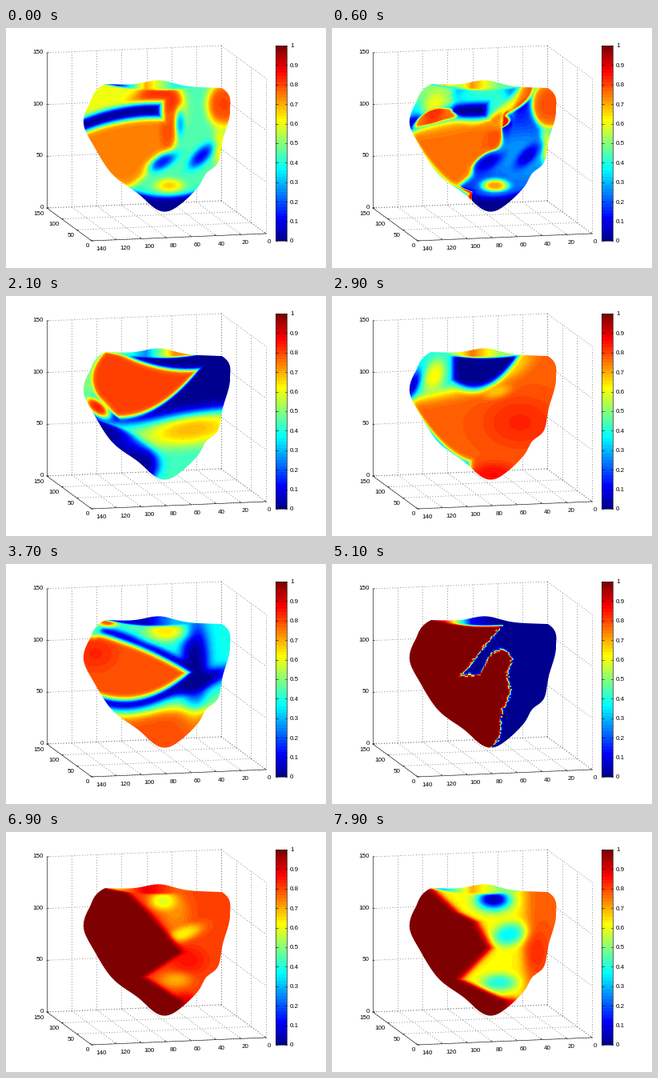
Write a matplotlib script that moves like this. It is 400 px wide and 300 px high and loops after 8 s.

```python
import numpy as np
import matplotlib.pyplot as plt
from matplotlib.animation import FuncAnimation
from matplotlib.path import Path

W, H, DPI = 400, 300, 100
PX = 72 / DPI
FRAMES, STEP = 80, 100

plt.rcParams["font.family"] = "Liberation Sans"
fig = plt.figure(figsize=(W / DPI, H / DPI), dpi=DPI, facecolor="white")
ax = fig.add_axes([0, 0, 1, 1])
ax.axis("off")

X0, X1, Y0, Y1 = 90, 290, 60, 236
X, Y = np.meshgrid(np.arange(X0, X1) + 0.5, np.arange(Y0, Y1) + 0.5)
GRAIN = np.kron(np.random.default_rng(4).normal(size=(88, 50)), np.ones((2, 4)))


def jet(v):
    x = (np.clip(np.floor(v * 64), 0, 63) + 1) / 64
    return np.clip(1.5 - np.abs(4 * x[..., None] - np.array([3, 2, 1])), 0, 1)


# ---- silhouette: a closed spline cut off by the upper rim ---------------
def spline(pts, n=10):
    p = np.array(pts, float)
    a, b, c = np.roll(p, 1, 0), np.roll(p, -1, 0), np.roll(p, -2, 0)
    t = (np.arange(n) / n)[:, None, None]
    q = p + t * (b - a) / 2 + t**2 * (a - 2.5 * p + 2 * b - c / 2) \
        + t**3 * (1.5 * (p - b) + (c - a) / 2)
    return q.transpose(1, 0, 2).reshape(-1, 2)


def coverage(path, n=4):
    total = np.zeros(X.shape)
    for dx, dy in np.ndindex(n, n):
        x, y = X + (dx + 0.5) / n - 0.5, Y + (dy + 0.5) / n - 0.5
        inside = path.contains_points(np.column_stack([x.ravel(), y.ravel()]))
        total += inside.reshape(X.shape)
    return total / n**2


BODY = Path(spline([(197, 50), (124, 70), (104, 95), (97, 120), (110, 148), (133, 183),
                    (165, 207), (187, 226), (203, 229), (221, 218), (240, 199),
                    (250, 182), (265, 168), (271, 140), (280, 104), (270, 75)]))
TOP = 70 + (X - 124) / 29 - 7 * np.exp(-((X - 192) / 24) ** 2)
ALPHA = coverage(BODY) * np.clip(Y - TOP + 0.5, 0, 1)


# ---- building blocks for the value field --------------------------------
def rise(d, soft):
    return 1 / (1 + np.exp(-np.clip(d / soft, -40, 40)))


def bend(*pts):
    """y of the polynomial through the points, for every x."""
    x, y = zip(*pts)
    return np.polyval(np.polyfit(x, y, len(pts) - 1), X)


def side(*pts):
    """x of the polynomial through the points, for every y."""
    x, y = zip(*pts)
    return np.polyval(np.polyfit(y, x, len(pts) - 1), Y)


def zigzag(*pts):
    x, y = zip(*pts)
    return np.interp(Y, y, x)


def radius(x, y, rx, ry, tilt):
    c, s = np.cos(np.radians(tilt)), np.sin(np.radians(tilt))
    return np.hypot(((X - x) * c + (Y - y) * s) / rx, ((Y - y) * c - (X - x) * s) / ry)


def oval(x, y, rx, ry, tilt=0):
    return (1 - radius(x, y, rx, ry, tilt)) * min(rx, ry)


def spot(val, x, y, rx, ry, tilt=0):
    return val, np.exp(-radius(x, y, rx, ry, tilt) ** 2.8)


def rim(left, mid, right):
    """Far wall, seen above the near edge."""
    near = 77.5 - 7.5 * ((X - 190) / 66) ** 2
    return np.interp(X, [140, 175, 210], [left, mid, right]), rise(near - Y, 0.6)


def halo(d, val, width=2.5, soft=1.3):
    return [(0.45, rise(d + width, soft)), (val, rise(d, soft))]


def paint(base, *layers):
    f = np.full(X.shape, float(base))
    for val, w in layers:
        f += (val - f) * w
    return f


# ---- states of the wave -------------------------------------------------
def mixed():
    band = np.minimum(7 - abs(Y - bend((97, 121), (150, 106), (190, 103))), 192 - X)
    return paint(
        0.74,
        (0.44, rise(X - side((216, 75), (208, 145), (160, 195)), 4)),
        (0.6, rise(bend((97, 118), (150, 92), (170, 72)) - Y, 4)),
        (0.79, rise(oval(202, 128, 9, 28), 2)),
        (0.82, rise(oval(193, 90, 25, 17), 2)),
        *halo(band, 0, 4, 1.8),
        (0.8, rise(oval(272, 96, 20, 27), 3)),
        spot(0.62, 268, 148, 10, 26), spot(0.3, 218, 120, 6, 18),
        spot(0.12, 244, 160, 20, 9, -45), spot(0.15, 196, 167, 20, 9, -30),
        spot(0.66, 204, 197, 18, 9),
        (0.0, rise(Y - bend((165, 206), (205, 211), (235, 206)), 2)),
        rim(0.1, 0.7, 0.4))


def plateau():
    hole = np.minimum(X - 151, bend((150, 104), (190, 112), (226, 82)) - Y)
    cyan = np.minimum(160 - X, bend((97, 130), (130, 119), (165, 112)) - Y)
    lower = np.minimum(Y - bend((130, 176), (150, 195), (172, 207)), 172 - X)
    return paint(
        0.78,
        (0.61, rise(bend((97, 130), (170, 119), (265, 80)) - Y, 5) * rise(244 - X, 9)),
        (0.4, rise(cyan, 3)), spot(0.62, 128, 100, 13, 22, 20),
        (0.05, rise(oval(100, 112, 7, 18, 25), 2)),
        *halo(hole, 0, 5, 2.2),
        spot(0.66, 207, 120, 17, 8, -15), spot(0.83, 235, 158, 45, 32),
        spot(0.86, 202, 224, 30, 16), (0.25, rise(lower, 1.8)),
        rim(0.4, 0.76, 0.52))


def spiral():
    left = side((122, 72), (108, 100), (130, 142))
    patch = np.minimum(bend((125, 149), (185, 139), (232, 100)) - Y, X - left)
    patch = np.minimum(patch, Y - bend((150, 76), (195, 91), (232, 94)))
    tongue = np.minimum(Y - bend((130, 158), (200, 156), (272, 142)),
                        X - side((130, 160), (175, 185), (185, 225)))
    return paint(
        0.01,
        (0.5, rise(132 - X, 5) * rise(128 - Y, 3)),
        (0.43, rise(tongue, 4)), spot(0.68, 232, 167, 64, 20, -8),
        *halo(patch, 0.8), *halo(oval(114, 139, 15, 7, 38), 0.84),
        rim(0.5, 0.25, 0.73))


def rotor():
    patch = np.minimum(Y - bend((105, 88), (165, 106), (225, 136)),
                       bend((110, 160), (165, 166), (226, 135)) - Y)
    return paint(
        0.79,
        (0.48, rise(181 - Y, 4)),
        (0.38, rise(X - 205, 8) * rise(160 - Y, 5)),
        (0.4, rise(patch + 21, 4)),
        (0.0, rise(oval(236, 122, 16, 46), 4)),
        (0.0, rise(oval(240, 147, 40, 10, -20), 2.5)),
        (0.0, rise(patch + 13, 2.5)),
        spot(0.4, 196, 82, 32, 18), spot(0.64, 199, 84, 24, 12),
        *halo(patch, 0.79, 4, 1.6), spot(0.83, 112, 112, 24, 20),
        spot(0.45, 111, 82, 10, 8, -50), spot(0.8, 127, 72, 13, 7),
        rim(0.1, 0.05, 0.3))


def shock():
    hook = np.maximum(side((214, 75), (176, 122)) - X,
                      Y - bend((186, 137), (208, 107), (224, 116)))
    red = np.minimum(side((224, 112), (220, 160), (202, 228)) + 3 * np.sin(Y / 8) - X,
                     np.maximum(hook, Y - 138))
    return paint(0, (1, rise(red + 1.1 * GRAIN, 0.7)), rim(0.9, 0.1, 0))


def polar():
    red = zigzag((150, 72), (181, 102), (222, 150), (174, 181), (222, 212)) - X
    return paint(
        0.8,
        spot(0.85, 228, 160, 24, 18), spot(0.73, 212, 100, 18, 24),
        spot(0.59, 196, 86, 17, 12), spot(0.63, 222, 127, 24, 9, -20),
        spot(0.7, 212, 185, 20, 10), spot(0.9, 224, 212, 16, 10),
        (1, rise(red, 2.6)), rim(0.68, 0.9, 0.78))


def recovery():
    red = zigzag((126, 70), (158, 100), (182, 112), (200, 145), (162, 184), (222, 212)) - X
    return paint(
        0.78,
        (0.62, rise(242 - X, 5)), spot(0.82, 256, 150, 16, 30),
        spot(0.3, 202, 86, 24, 15), spot(0.05, 202, 84, 16, 9),
        spot(0.36, 221, 128, 21, 14, -15), spot(0.4, 209, 188, 22, 11),
        spot(0.85, 222, 214, 16, 8), (1, rise(red, 3.2)), rim(0.3, 0.7, 0.5))


# (start, end, first state, last state); a later start cuts an earlier stretch
MIXED, PLATEAU, SPIRAL, ROTOR = mixed(), plateau(), spiral(), rotor()
SHOCK, POLAR, RECOVERY = shock(), polar(), recovery()
STRETCHES = [
    (0, 1200, MIXED, PLATEAU), (1200, 2100, PLATEAU, SPIRAL),
    (2100, 2900, SPIRAL, PLATEAU), (2900, 3700, PLATEAU, ROTOR),
    (3700, 4400, ROTOR, PLATEAU), (4400, 5300, PLATEAU, SPIRAL),
    (5000, 5100, SHOCK, SHOCK), (5100, 6900, SHOCK, POLAR),
    (6900, 7900, POLAR, RECOVERY),
]
PEAK = 0.86
SWEEP = ((X - 190) / 90 + (Y - 145) / 80) / 2


def field(t):
    """Slow decay where values fall, travelling upstroke where they rise."""
    start, end, a, b = [s for s in STRETCHES if s[0] <= t][-1]
    dt, t = end - start, t - start
    fade = a + (b - a) * t / dt
    age = 1.3 * dt * np.sqrt(np.clip(1 - b / PEAK, 0, 1))
    fire = np.clip(dt - age + 0.15 * dt * SWEEP, 50, dt - 50)
    before = a * (1 - np.clip(t / fire, 0, 1) ** 2)
    after = PEAK + (b - PEAK) * np.clip((t - fire) / (dt - fire), 0, 1) ** 2
    wave = before + (after - before) * np.clip((t - fire) / 80 + 0.5, 0, 1)
    r = np.clip((b - a - 0.1) / 0.25, 0, 1)
    return fade + (wave - fade) * r * r * (3 - 2 * r)


# ---- axes box, ticks and labels -----------------------------------------
def proj(x, y, z):
    return (269 - 218 * x / 140 + 56 * (1 - y / 150),
            216 + 9 * x / 140 + 41 * (1 - y / 150) - 194 * z / 150)


def line(p, q, dotted=False):
    style = dict(lw=0.6, ls=(0, (1, 3)), color="#666") if dotted else dict(lw=0.45, color="#222")
    ax.plot(*zip(p, q), zorder=1, **style)


def label(x, y, s, ha):
    ax.text(x, y, s, ha=ha, va="center_baseline", fontsize=8 * PX, zorder=4)


for x in range(0, 141, 20):
    line(proj(x, 150, 0), proj(x, 150, 150), True)
    line(proj(x, 150, 0), proj(x, 0, 0), True)
    px, py = proj(x, 0, 0)
    line((px, py), (px - 2, py - 1.5))
    label(329 - 1.5 * x, py + 9.5, str(x), "center")
for y in range(0, 151, 50):
    line(proj(0, y, 0), proj(0, y, 150), True)
    line(proj(0, y, 0), proj(140, y, 0), True)
    px, py = proj(140, y, 0)
    line((px, py), (px + 2.5, py - 0.1))
    label(px - 3, py + 6, str(y), "right")
for z in range(0, 151, 50):
    line(proj(0, 150, z), proj(140, 150, z), True)
    line(proj(0, 150, z), proj(0, 0, z), True)
    px, py = proj(140, 150, z)
    line((px, py), (px + 2.5, py - 0.1))
    label(px - 4, py - 1.5, str(z), "right")
line(proj(140, 150, 0), proj(140, 150, 150))
line(proj(140, 150, 0), proj(140, 0, 0))
line(proj(140, 0, 0), proj(0, 0, 0))

# ---- colour bar ---------------------------------------------------------
L, R, T, B = 337, 351, 22, 266
ramp = jet((np.arange(64)[::-1, None] + 0.5) / 64)
ax.imshow(ramp, extent=(L, R, B, T), aspect="auto", interpolation="nearest", zorder=2)
ax.add_patch(plt.Rectangle((L, T), R - L, B - T, fill=False, lw=0.5, ec="#222", zorder=3))
for i in range(11):
    y = B - (B - T) * i / 10
    for x in (L, R - 2.5):
        ax.plot([x, x + 2.5], [y, y], color="k", lw=0.4, zorder=3)
    label(355, y, f"{i / 10:g}", "left")


# ---- animation ----------------------------------------------------------
def surface(i):
    return np.dstack([jet(field(i * STEP)), ALPHA])


heart = ax.imshow(surface(0), extent=(X0, X1, Y1, Y0), aspect="auto",
                  interpolation="nearest", zorder=2)
ax.set_xlim(0, W)
ax.set_ylim(H, 0)


def update(i):
    heart.set_data(surface(i))
    return [heart]


anim = FuncAnimation(fig, update, frames=FRAMES, interval=STEP, repeat=True,
                     repeat_delay=0, blit=False)
plt.show()
```
